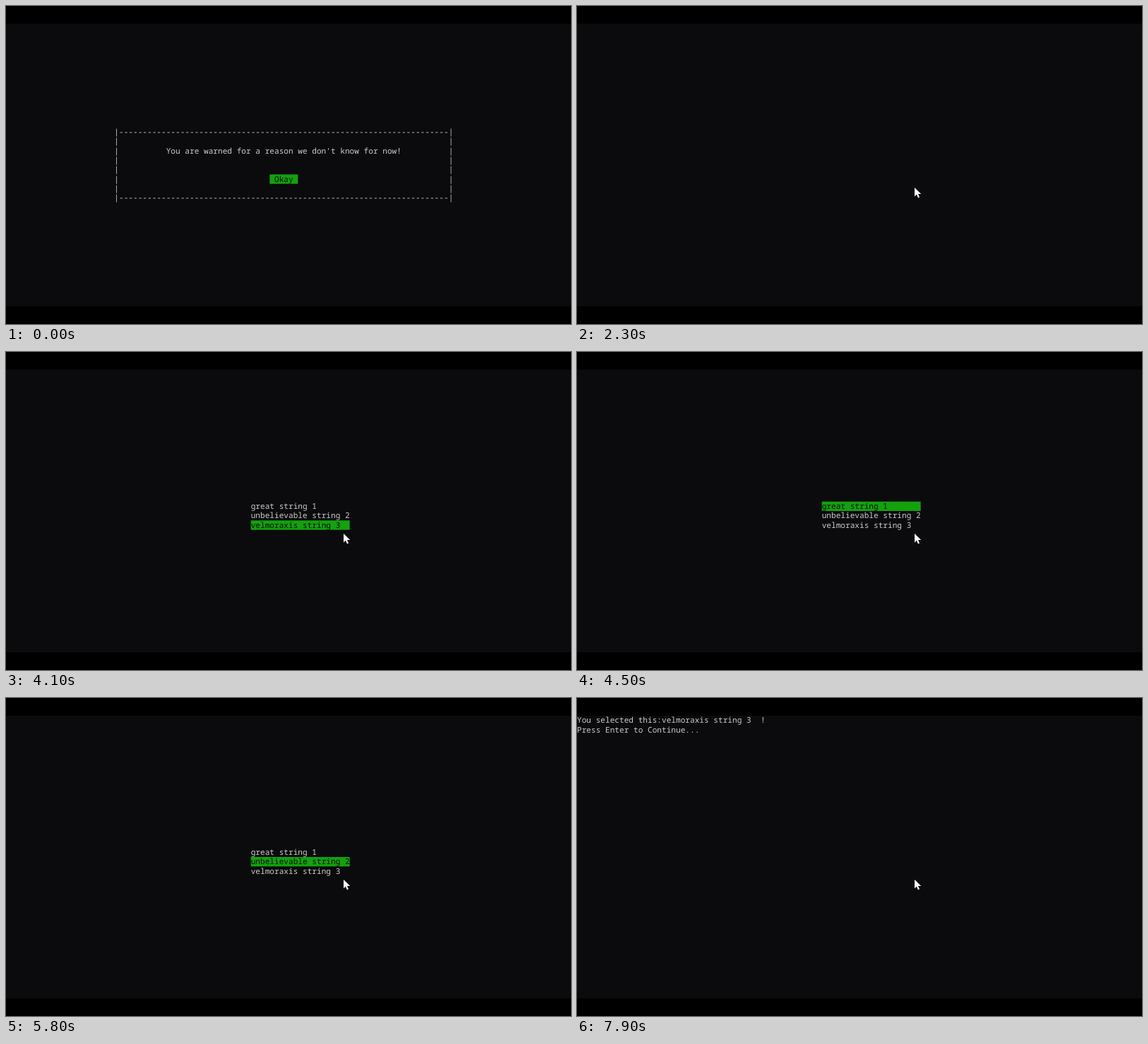
An HTML page that plays this animation: 800x450 px, repeating every 8000 ms.

```html
<!DOCTYPE html>
<html lang="en">
<head>
<meta charset="utf-8">
<title>Console menu</title>
<style>
  html, body { margin: 0; width: 100%; height: 100%; overflow: hidden; background: #000; }
  svg { display: block; width: 100vw; height: 100vh; }
  text {
    font: 11.111px "Noto Sans Mono", "DejaVu Sans Mono", monospace;
    text-rendering: geometricPrecision;
    white-space: pre;
  }
</style>
</head>
<body>
<svg id="stage" viewBox="0 0 800 450">
  <rect width="800" height="450" fill="#000"/>
  <rect y="25" width="800" height="400" fill="#0b0a0c"/>
</svg>
<script>
const LOOP = 8000, STEP = 100;
const CELL_W = 800 / 120, CELL_H = 400 / 30, TOP = 25, BASELINE = 10.3;
const LIGHT = '#cccccc', DARK = '#0c0c0c', GREEN = '#13a10e';
const stage = document.getElementById('stage');

function add(parent, tag, attrs) {
  const node = document.createElementNS('http://www.w3.org/2000/svg', tag);
  for (const key in attrs) node.setAttribute(key, attrs[key]);
  return parent.appendChild(node);
}

function print(parent, row, col, str, fill = LIGHT) {
  const node = add(parent, 'text', { x: col * CELL_W, y: TOP + row * CELL_H + BASELINE, fill });
  node.textContent = str;
  return node;
}

function bar(parent, row, col, cells) {
  return add(parent, 'rect', {
    x: col * CELL_W, y: TOP + row * CELL_H,
    width: cells * CELL_W, height: CELL_H, fill: GREEN
  });
}

// Warning dialog
const dialog = add(stage, 'g', {});
for (let row = 11; row <= 18; row++) {
  print(dialog, row, 23, '|');
  print(dialog, row, 94, '|');
}
for (const row of [11, 18]) print(dialog, row, 24, '-'.repeat(70));
print(dialog, 13, 34, "You are warned for a reason we don't know for now!");
bar(dialog, 16, 56, 6);
print(dialog, 16, 57, 'Okay', DARK);

// Selection menu
const items = ['great string 1', 'unbelievable string 2', 'velmoraxis string 3'];
const menu = add(stage, 'g', {});
const rows = items.map((str, i) => ({
  bar: bar(menu, 14 + i, 52, 21),
  text: print(menu, 14 + i, 52, str)
}));

// Result message
const result = add(stage, 'g', {});
print(result, 0, 0, 'You selected this:' + items[2].padEnd(21) + '!');
print(result, 1, 0, 'Press Enter to Continue...');

const cursor = add(stage, 'path', {
  d: 'M0 0V12.4L2.9 9.8L5 14.4L7 13.5L5 9.1H9.2Z', fill: '#fff'
});

// [time, selected item]
const picks = [[2400, 0], [3300, 1], [3800, 2], [4300, 0], [4700, 1], [5100, 2], [5800, 1], [6700, 2]];

function show(node, on) {
  node.setAttribute('visibility', on ? 'visible' : 'hidden');
}

// One sweep around the button, from below it to its right side
function cursorAt(t) {
  const p = Math.min(1, Math.max(0, (t - 1100) / 700));
  const ease = p * p * (3 - 2 * p);
  const angle = (61 + 283 * ease) * Math.PI / 180;
  const x = 411 + 84 * Math.cos(angle) - 13.7 * ease ** 4;
  const y = 269.4 + 45 * Math.sin(angle);
  return [Math.round(x), Math.round(y)];
}

function draw(time) {
  const t = Math.floor(time / STEP) * STEP;
  show(dialog, t < 2300);
  show(result, t >= 7600);
  show(cursor, t >= 900);
  cursor.setAttribute('transform', `translate(${cursorAt(t)})`);

  const open = t >= 2400 && t < 7600;
  const pick = picks.reduce((last, [at, i]) => t >= at ? i : last, 0);
  show(menu, open);
  rows.forEach((row, i) => {
    show(row.bar, open && i === pick);
    row.text.setAttribute('fill', i === pick ? DARK : LIGHT);
  });
}

const start = performance.now();
function tick(now) {
  draw(Math.max(0, now - start) % LOOP);
  requestAnimationFrame(tick);
}
draw(0);
requestAnimationFrame(tick);
</script>
</body>
</html>
```
